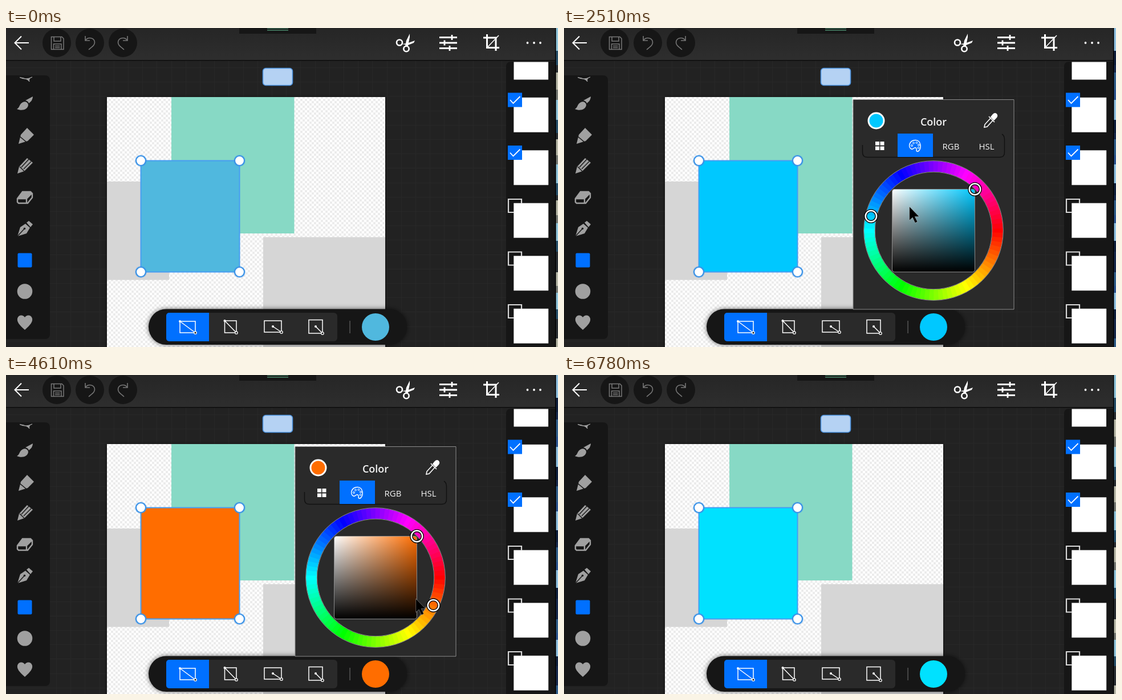
These frames come from a looping animation (968 by 559 pixels, 6870 ms). An HTML page with a canvas:

```html
<!DOCTYPE html>
<html lang="en">
<head>
<meta charset="utf-8">
<title>Colour picker</title>
<style>
html, body { margin: 0; width: 100%; height: 100%; overflow: hidden; background: #222 }
canvas { display: block }
</style>
</head>
<body>
<canvas id="stage" width="968" height="559"></canvas>
<script>
const c = document.getElementById('stage').getContext('2d');
const LOOP = 6870, TAU = Math.PI * 2, RAD = Math.PI / 180;
const DARK = '#161616', BLUE = '#0070ff', ICON = '#a0a0a0';
const RING = {x: 648, y: 355, r: 112.5};
const FIELD = {x: 575.5, y: 282.5, size: 145};

// Tracks: pairs of time and value
const HUE = [0, 196, 1090, 196, 1170, 193, 2750, 193, 3190, 207, 3360, 207, 3670, 231, 3980, 291,
  4140, 301, 4680, 398, 4760, 402, 5070, 504, 5380, 538, 5600, 547];
const SAT = [0, .64, 1090, .64, 1170, .67, 1790, .67, 2300, .94, 2440, 1];
const VAL = [0, .87, 1090, .87, 1170, 1];
const FADE = [1080, 0, 1250, 1, 6200, 1, 6400, 0];
const SLIDE = [1080, 10, 1250, 1, 1340, 0];
const POINTER_X = [150, 750, 630, 660, 860, 657, 1090, 660, 1250, 671, 1700, 677, 2300, 706, 2420, 660,
  2510, 606, 2750, 547, 5600, 569, 5760, 686, 5910, 686, 6080, 703, 6240, 760, 6400, 798];
const POINTER_Y = [150, 556, 630, 529, 860, 522, 1090, 510, 1250, 446, 1700, 312, 2300, 285, 2420, 300,
  2510, 313, 2750, 328, 5600, 342, 5760, 474, 5910, 476, 6080, 518, 6240, 540, 6400, 562];
const POINTER_R = [2750, 105, 3670, 99.6, 4140, 98, 5070, 62, 5600, 80];

function at(track, t) {
  let i = 0;
  while (i < track.length && track[i] <= t) i += 2;
  if (!i) return track[1];
  if (i >= track.length) return track[track.length - 1];
  const [t0, a, t1, b] = track.slice(i - 2, i + 2);
  return a + (b - a) * (t - t0) / (t1 - t0);
}

function hsv(h, s, v) {
  const part = n => {
    const k = (n + h / 60) % 6;
    return Math.round(255 * v * (1 - s * Math.max(0, Math.min(k, 4 - k, 1))));
  };
  return `rgb(${part(5)},${part(3)},${part(1)})`;
}

function paint(path, fill, line, width = 2) {
  if (fill) { c.fillStyle = fill; c.fill(path); }
  if (line) { c.strokeStyle = line; c.lineWidth = width; c.stroke(path); }
}
const shape = (d, fill, line, width) => paint(new Path2D(d), fill, line, width);
function rect(x, y, w, h, fill, line, width, radius = 0) {
  const p = new Path2D();
  p.roundRect(x, y, w, h, radius);
  paint(p, fill, line, width);
}
function disc(x, y, r, fill, line, width) {
  const p = new Path2D();
  p.arc(x, y, r, 0, TAU);
  paint(p, fill, line, width);
}
function shaded(blur, color, draw) {
  c.shadowBlur = blur;
  c.shadowColor = color;
  draw();
  c.shadowBlur = 0;
  c.shadowColor = 'transparent';
}
function gradient(x0, y0, x1, y1, from, to) {
  const g = c.createLinearGradient(x0, y0, x1, y1);
  g.addColorStop(0, from);
  g.addColorStop(1, to);
  return g;
}
function text(s, x, y, font) {
  c.font = font + ' "Open Sans", "Noto Sans", sans-serif';
  c.textAlign = 'center';
  c.fillStyle = '#f4f4f4';
  c.fillText(s, x, y);
}

const tile = document.createElement('canvas');
tile.width = tile.height = 8;
const tc = tile.getContext('2d');
tc.fillStyle = '#fff';
tc.fillRect(0, 0, 8, 8);
tc.fillStyle = '#ececec';
tc.fillRect(0, 0, 4, 4);
tc.fillRect(4, 4, 4, 4);
const checker = c.createPattern(tile, 'repeat');

function backdrop() {
  c.fillStyle = '#222';
  c.fillRect(0, 0, 968, 559);
  c.fillStyle = '#282828';
  for (let x = 88; x < 968; x += 25.2) c.fillRect(Math.round(x), 57, 1, 502);
  for (let y = 69; y < 559; y += 25.2) c.fillRect(0, Math.round(y), 968, 1);
}

function artboard(color) {
  shaded(6, '#0008', () => rect(177, 121, 488, 450, '#fff'));
  rect(177, 121, 488, 450, checker);
  rect(290, 121, 215.5, 239, '#87d9c5');
  rect(177, 269, 109, 172.5, '#d6d6d6');
  rect(451, 366.5, 214, 200, '#d6d6d6');
  rect(236.5, 232.5, 173, 195, color, '#479df2', 2);
  for (const x of [236.5, 409.5]) for (const y of [232.5, 427.5]) {
    disc(x, y, 10.5, '#3b97f055');
    disc(x, y, 8.5, '#fff', '#3b92e6', 2.2);
  }
  rect(450.5, 70.5, 52, 30, '#b5d2f3', '#4a90dc', 1.6, 5);
}

function header() {
  rect(0, 0, 968, 57, gradient(0, 0, 0, 57, '#262626', '#2e2e2e'));
  rect(0, 56, 968, 1.5, '#0d0d0d');
  rect(409, 0, 135, 10, DARK);
  rect(458, 0, 37, 1, '#4b8a6c');
  rect(458, 3, 37, 1.5, '#4b8a6c');
  shape('M40 26H16M27 14.5L15.5 26 27 37.5', 0, '#fff', 2);
  for (const x of [89, 147, 205]) disc(x, 26, 25, DARK);
  shape('M79.5 15.5H98L101 18.5V37.5H79.5ZM84 15.5V23H96V15.5M83.5 37.5V28H97V37.5M86 31.5H94.5M86 34.5H94.5', 0, '#777', 1.5);
  shape('M139 14V22H147M139.5 21.5C144 15 155 17 155.5 25 155.5 30 152 32 145 38', 0, '#777', 1.6);
  shape('M213 14V22H205M212.5 21.5C208 15 197 17 196.5 25 196.5 30 200 32 207 38', 0, '#777', 1.6);
  disc(690, 25.5, 5, 0, '#fff', 2.6);
  disc(702, 36.5, 4.7, 0, '#fff', 2.6);
  shape('M694 28L703 27 717 22 715 26 705 30ZM700 32L702 22 708 10 708 16 705 31Z', '#fff');
  shape('M760 16.5H791M760 26H791M760 35.5H791M782 12V21M769 21.5V30.5M778 31V40', 0, '#fff', 2.8);
  shape('M843.5 11V34.5H865M837 17H859V40', 0, '#fff', 3);
  shape('M845 33L864 13', 0, '#fff', 1.6);
  for (const x of [914.5, 926, 937]) disc(x, 26, 1.9, '#fff');
}

function tools() {
  rect(-10, 83, 87, 462, DARK, 0, 0, 8);
  shape('M24 86.5Q33 92 46 86Q39 88 41 94Q37 88 24 86.5Z', ICON, ICON, 1);
  shape('M19 142C24 140 23 134 28 131 33 127 39 130 39 135 38 143 28 146 19 142ZM34 127L47 120Q47 127 40 132Q39 128 34 127Z', ICON);
  shape('M22 203L26 187 37 175 49 187 38 198ZM22 203L29 196', ICON);
  shape('M24 190L36 200', 0, DARK, 1.5);
  shape('M20 255L23 243 37 228 47 236 32 251Z', ICON);
  shape('M24 243L32 251M27 244L40 230M31 247L44 234', 0, DARK, 1.4);
  shape('M20 299L29 287H43L46 290V297L38 307H22L20 305ZM20 299H36L45 290M36 299V307', 0, ICON, 2.4);
  shape('M29 287H43L45 290 36 299H20Z', ICON);
  shape('M20 365L25 349 34 343 42 350 36 360ZM36 341L40 338 47 344 43 349Z', ICON);
  shape('M20 365L32 352', 0, DARK, 1.4);
  disc(32.5, 351.5, 1.8, DARK);
  rect(20.5, 394.5, 25, 25, BLUE, 0, 0, 2);
  disc(33, 461.5, 13.3, ICON);
  shape('M33 529C23 520 19 515 20 509 22 502 30 502 33 507 36 502 44 502 46 509 47 515 43 520 33 529Z', ICON);
}

function layers() {
  rect(877, 59, 100, 510, DARK, 0, 0, 8);
  rect(890.5, 59.5, 60.5, 31, '#fff');
  for (let i = 0; i < 5; i++) {
    const y = 122 + i * 92.5;
    if (i > 1) rect(881, y - 7, 23, 23, 0, '#d8d8d8', 2.2);
    rect(890.5, y, 60.5, 60.5, '#fff', '#ccc', .6);
    if (i < 2) {
      rect(880, y - 8.5, 25, 25, BLUE);
      shape(`M884 ${y + 4}l5.500 6 12-12`, 0, '#fff', 1.8);
    }
  }
}

// Sliver of another window at the right edge
function edge(focused) {
  const tones = focused
    ? ['#8fc0e0', '#17294c', '#2d5590', '#10203d', '#315e8a']
    : ['#8fc4da', '#2b2f33', '#777a74', '#28506a', '#b8b8a8'];
  rect(963, 0, 5, 559, '#000');
  for (let y = 0, n = 0; y < 559; n++) {
    const h = n ? 8 + n * 17 % 29 : 40;
    rect(964.5, y, 3.5, h, tones[n * 3 % 5]);
    y += h;
  }
}

function toolbar(color) {
  shaded(8, '#0009', () => rect(250, 492.5, 453, 62.5, DARK, 0, 0, 31));
  rect(281, 499, 300, 50, '#2a2a2a', 0, 0, 6);
  rect(281, 499, 75, 50, BLUE, 0, 0, [5, 0, 0, 5]);
  const frame = (x, y, w, h, x0, y0) => {
    rect(x, y, w, h, 0, '#fff', 1.5);
    shape(`M${x0} ${y0}L${x + w} ${y + h}`, 0, '#fff', 1.5);
    disc(x0, y0, 2, '#fff');
    disc(x + w, y + h, 2.2, DARK, '#fff', 1.3);
  };
  frame(305, 514, 27, 20, 305, 514);
  frame(383.5, 513, 20.5, 21, 383.5, 513);
  frame(453, 513, 30, 20, 468, 523);
  frame(531, 511.5, 24, 23.5, 543, 523);
  rect(602.5, 513, 1.2, 22, '#666');
  disc(648, 524, 24, color);
}

function knob(x, y) {
  disc(x, y, 9.7, 0, '#000', 5.2);
  disc(x, y, 9.7, 0, '#fff', 2.5);
}

function picker(t, hue, sat, val, color) {
  c.save();
  c.globalAlpha = at(FADE, t);
  c.translate(0, at(SLIDE, t));
  rect(507, 125.5, 282, 367.5, '#2a2a2a', '#8c8c8c', 1);
  disc(547.5, 162.5, 13.5, color, '#fff', 3);
  text('Color', 648, 170.5, '600 18px');
  shape('M752 152C757 147 762 153 758 157L754 161 749 156ZM745 155L755 165', '#fff', '#fff', 1.6);
  shape('M748 158L738 169 737 174 742 173 752 162', 0, '#fff', 1.6);
  shape('M523.5 205V218Q523.5 226.5 532 226.5H764Q772.5 226.5 772.5 218V195Q772 188 768 186', 0, '#111', 1.4);
  rect(585, 185, 62, 41, BLUE);
  for (const x of [546, 554.5]) for (const y of [199, 207.5]) rect(x, y, 7, 6.5, '#fff');
  shape('M616 196.5C605 197 603 209 609 212 613 214 613 208 617 210 620 212 616 216 620 216.500 628 214 627 196 616 196.500Z', 0, '#fff', 1.5);
  for (const [x, y] of [[610, 206], [613, 201.5], [618.5, 201], [622, 205], [621.5, 210]]) disc(x, y, 1.5, 0, '#fff', 1);
  text('RGB', 678.5, 213, '15px');
  text('HSL', 741, 213, '15px');

  c.lineWidth = 19;
  for (let h = 0; h < 360; h += 4) {
    c.beginPath();
    c.arc(RING.x, RING.y, RING.r, (h - 2.2) * RAD, (h + 2.2) * RAD);
    c.strokeStyle = hsv(h, 1, 1);
    c.stroke();
  }
  disc(RING.x, RING.y, 122.3, 0, '#8a8a8a', 1);
  disc(RING.x, RING.y, 102.7, 0, '#8a8a8a', 1);

  const {x, y, size} = FIELD;
  rect(x, y, size, size, gradient(x, 0, x + size, 0, '#fff', hsv(hue, 1, 1)), 0, 0, 4);
  rect(x, y, size, size, gradient(0, y, 0, y + size, '#0000', '#000'), '#8a8a8a', 1, 4);
  knob(x + sat * size, y + (1 - val) * size);
  knob(RING.x + RING.r * Math.cos(hue * RAD), RING.y + RING.r * Math.sin(hue * RAD));
  c.restore();
}

function pointer(t, hue) {
  let x = at(POINTER_X, t), y = at(POINTER_Y, t);
  if (t >= 2750 && t < 5600) {
    const r = at(POINTER_R, t), a = (hue + 2) * RAD;
    x = RING.x + r * Math.cos(a);
    y = RING.y + r * Math.sin(a);
  }
  shape(`M${x} ${y}v24l5.500-5 4.500 9.500 4-2-4.500-9h7.500z`, '#000', '#fff6', .8);
}

function draw(now) {
  const t = now % LOOP;
  const hue = at(HUE, t), sat = at(SAT, t), val = at(VAL, t);
  const color = hsv(hue, sat, val);
  backdrop();
  artboard(color);
  header();
  tools();
  layers();
  edge(t >= 780 && t < 6780);
  toolbar(color);
  if (t >= 1090 && t < 6400) picker(t, hue, sat, val, color);
  if (t >= 150 && t < 6400) pointer(t, hue);
  requestAnimationFrame(draw);
}
const start = performance.now();
requestAnimationFrame(function first() {
  draw(0);
});
const nativeDraw = draw;
draw = () => nativeDraw(performance.now() - start);
</script>
</body>
</html>
```
